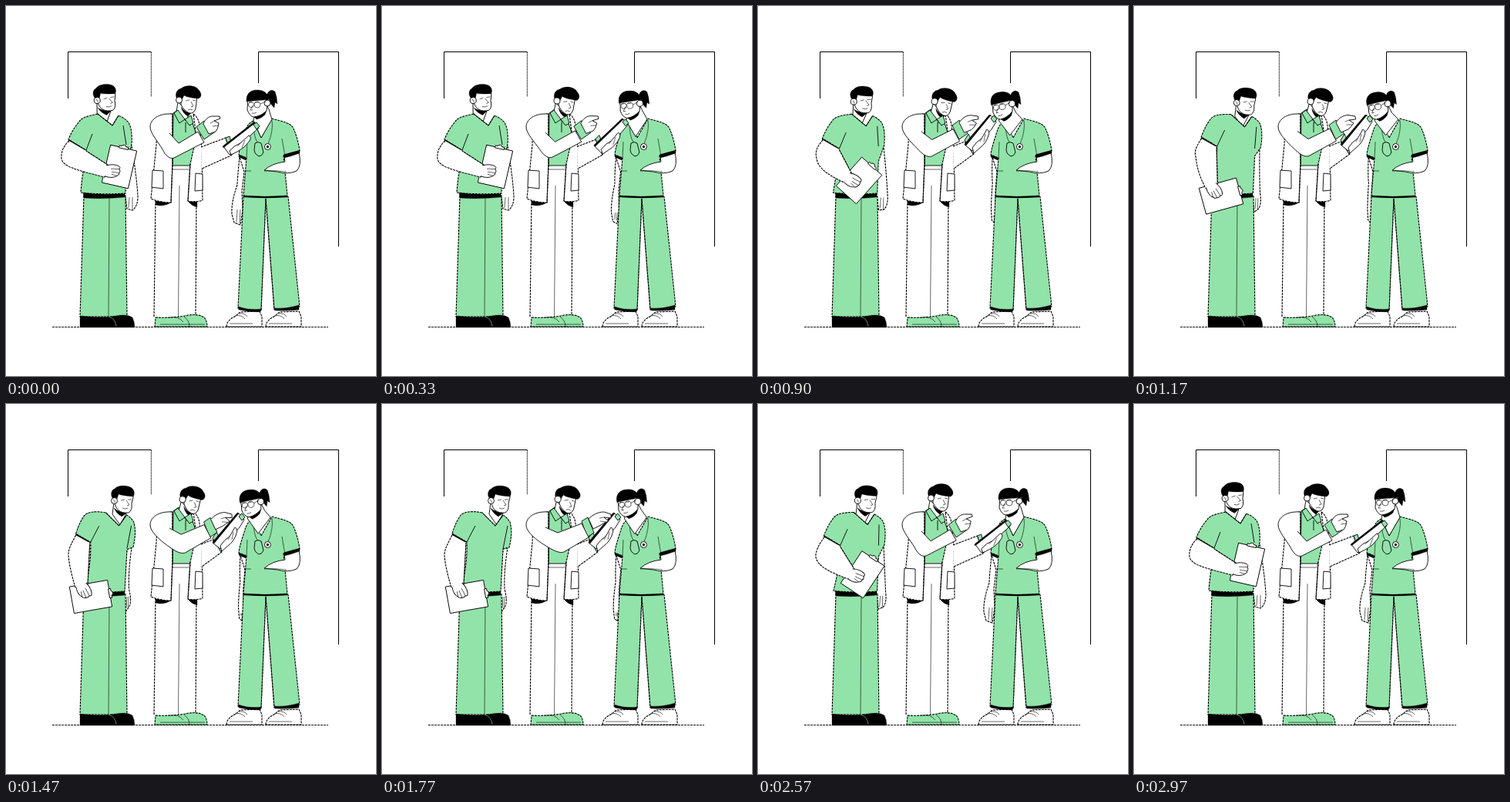
An HTML page that plays this animation: 480x480 px, repeating every 3 s.

```html
<!DOCTYPE html>
<html lang="en">
<head>
<meta charset="utf-8">
<title>Medical team</title>
<style>
html, body { margin: 0; width: 100%; height: 100%; overflow: hidden; background: #fff; }
svg { display: block; width: 100vw; height: 100vh; }
path, circle { stroke: #000; stroke-width: .9; stroke-linejoin: round; fill: none; }
.g { fill: #92e3a9; }
.w { fill: #fff; }
.k { fill: #000; stroke-width: .3; }
.room { stroke-width: 1; }
.dot { stroke-dasharray: 3 1; stroke-width: 1.1; }
.fine { stroke-dasharray: 1 1; stroke-width: 1.4; }
.thin { stroke-width: .6; }
.pale { stroke: #92e3a9; stroke-width: .6; }
</style>
</head>
<body>
<svg id="stage" viewBox="0 0 480 480"></svg>
<script>
const LOOP = 3000;
const stage = document.getElementById('stage');

// Smoothly eased value through [time, value] keys.
function track(t, keys) {
  if (t <= keys[0][0]) return keys[0][1];
  for (let i = 1; i < keys.length; i++) {
    const [t0, v0] = keys[i - 1], [t1, v1] = keys[i];
    if (t <= t1) {
      const x = (t - t0) / (t1 - t0);
      return v0 + (v1 - v0) * x * x * (3 - 2 * x);
    }
  }
  return keys[keys.length - 1][1];
}

const lerp = (a, b, w) => a + (b - a) * w;

// Blends two paths of equal structure; w may depend on the number's index.
function mix(a, b, w) {
  const target = b.match(/-?[\d.]+/g);
  let i = 0;
  return a.replace(/-?[\d.]+/g, n => {
    const k = typeof w === 'function' ? w(i) : w;
    return lerp(+n, +target[i++], k).toFixed(2);
  });
}

const path = (cls, d) => `<path class="${cls}" d="${d}"/>`;
const disc = (cls, x, y, r) => `<circle class="${cls}" cx="${x}" cy="${y}" r="${r}"/>`;
const group = (transform, body) => `<g transform="${transform}">${body}</g>`;

const room =
  path('room', 'M80.5 120V59.5H188.5M327.5 100V59.5H431.5V312') +
  path('fine', 'M188.5 60V117') +
  path('dot', 'M60 416.5H418');

/* Nurse on the left */
const leftLegs =
  path('g dot', 'M101 246L96 403H157L155 246Z') +
  path('thin', 'M134 250L133 403') +
  path('k', 'M96 402Q126 405 142 402Q157 399 164 404Q167 410 167 417H96Z') +
  path('pale', 'M133 403Q142 405 143 416');

const leftNeck =
  path('w', 'M141 127L139 143L149 157L157 142Z') +
  path('k', 'M141 135Q148 141 158 141L151 146Q144 142 141 135Z');

const leftHead =
  path('w', 'M142 117C141 130 143 134 147 138Q152 142 160 141Q165 138 164 129L166 121L165 114Z') +
  path('k', 'M139 122C136 117 138 111 142 110C147 104 160 106 164 109C168 112 168 117 166 120Q152 119 147 117L145 123Z') +
  disc('w', 141.5, 125.5, 4) +
  path('thin', 'M150 125l5 -1M159 124l5 0M157 125l4 6l-3 1M152 135q4 2 7 0M140 124q3 1 2 4');

const board =
  path('w', 'M-17.5 -25H17.5V25H-17.5Z') +
  path('w', 'M-6 -24V-27H-3Q0 -31 3 -27H6V-24Z');

const leftHand =
  path('w', 'M-1 -7Q8 -10 15 -7Q18 -5 16 -3Q18 0 16 2Q16 5 13 6Q7 10 -2 7') +
  path('thin', 'M5 -3L16 -3M6 1L16 2M6 4L13 6');

function leftNurse(body, arm, level) {
  const headPose = `translate(${lerp(-22, 0, body)} ${lerp(-4, 0, level)}) rotate(${lerp(-8, 0, level)} 148 135)`;
  const armPath = mix(
    'M82 175C76 180 71 188 72 198C74 208 88 212 128 222L135 208L104 188',
    'M91 170C86 180 81 188 81 196C82 210 86 225 90 238L106 234L109 180',
    i => i < 6 || i > 15 ? body : arm);
  return path('w dot', mix(
      'M156 178L163 182Q170 225 171 247Q171 260 164 265L157 263L154 240Z',
      'M157 188L163 187Q158 215 159 240Q163 255 160 262L155 270L153 245Z', body)) +
    path('thin', mix('M160 248L159 262M164 248L164 264', 'M157 250L156 264M159 250L158 266', body)) +
    leftLegs +
    path('k', 'M100 242Q125 246 154 243L154 248Q126 251 101 249Z') +
    group(headPose, leftNeck) +
    path('g dot', mix(
      'M119 140C105 143 98 145 95 150C88 158 84 166 81 173L104 187C102 205 98 225 97 242Q125 245 155 243L156 206L163 180C164 165 162 155 158 150Q153 145 146 142L138 155Z',
      'M130 141C115 138 104 140 101 146C96 153 93 162 91 168L110 179C111 200 108 225 99 243Q125 245 154 243L157 188L165 186C169 170 168 160 166 153Q162 147 157 144L147 158Z', body)) +
    path('', mix('M119 140L138 155L146 142M112 166L104 187M152 155L156 180',
      'M130 141L147 158L157 144M121 158L110 179M163 158L157 188', body)) +
    group(headPose, leftHead) +
    path('k', mix('M81 173L104 187Q90 186 81 179Z', 'M91 168L110 179Q98 180 90 174Z', body)) +
    group(`translate(${lerp(147, 110, arm)} ${lerp(208.5, 250, arm)}) rotate(${lerp(13, 80, arm)})`, board) +
    path('w dot', armPath) +
    path('thin', mix('M135 208L104 188', 'M106 234L109 180', i => i > 1 ? body : arm)) +
    group(`translate(${lerp(131, 98, arm)} ${lerp(214, 236, arm)}) rotate(${lerp(2, 62, arm)})`, leftHand);
}

/* Doctor in the middle */
const doctorBody =
  path('w dot', 'M194 252L192 404M246 404L247 252') +
  path('thin', 'M225 233L223.5 404') +
  path('k', 'M194 253L215 254Q206 261 194 258ZM236 253L248 254V261Q240 259 236 253Z') +
  path('g dot', 'M194 404Q213 405 232 402Q250 398 258 405Q261 410 261 416H193Z') +
  path('thin', 'M231 403Q238 408 238 416M200 413H258M212 404q12 -2 18 6') +
  path('g', 'M217 139L224 134L233 145L240 146L248 170L239 207H216Z') +
  path('thin', 'M216 212H238') +
  path('w dot', 'M216 140Q200 140 196 152L195 180L188 250Q200 255 214 255L216 205Z') +
  path('w dot', 'M243 140Q250 145 251 155L254 185L255 252Q246 255 236 253L239 205L247 170Z') +
  path('', 'M214 255L216 205V140M236 253L239 205') +
  path('w', 'M190 213L204 214V237L189 235ZM246 217L255 218V239L245 240Z');

const doctorNeck =
  path('w', 'M223 125L221 137L233 149L239 138Z') +
  path('k', 'M227 131Q232 138 240 139L236 143Q229 139 227 131Z');

const doctorHead =
  path('w', 'M227 115L227 128Q231 136 238 139Q244 140 246 133L248 117Z') +
  path('k', 'M221 119C219 112 223 108 227 107C234 101 247 103 250 109C254 113 254 118 250 120Q236 119 231 116L228 122L225 119Z') +
  disc('w', 224.5, 122, 4) +
  path('thin', 'M233 123l5 -1M242 122l4 1M240 124l3 6l-3 1M236 135q3 -2 6 0');

const collar =
  path('g', 'M218 139L223 135L232 147L225 152ZM232 147L240 142L243 152L238 155Z') +
  path('', 'M233 151V164');

function doctor(lean, lift) {
  const headPose = `translate(${3 * lean} ${2.5 * lean}) rotate(${6 * lean} 232 137)`;
  return doctorBody + group(headPose, doctorNeck) + collar + group(headPose, doctorHead) +
    path('w dot', mix('M253 183L285 171L292 194L254 211', 'M253 182L268 176L280 192L254 211', lift)) +
    path('g', mix('M285 171L290 169L296 190L292 194Z', 'M268 174L273 166L282 184L279 192Z', lift));
}

function pointingArm(reach) {
  return path('g', mix('M247 157L257 149L270 164L257 173Z', 'M259 152L267 147L275 167L266 173Z', reach)) +
    path('w', mix(
      'M256 153C258 147 263 143 268 143L277 143L278 146L270 149L276 152Q275 160 272 163L263 166Z',
      'M268 149C274 143 281 140 288 140L297 143L297 148L288 147L294 152Q288 154 284 157L274 162Z', reach)) +
    path('thin', mix('M270 149L265 152M275 155L268 156', 'M288 147L282 148M291 153L283 152', reach)) +
    path('w', mix(
      'M215 140C198 139 187 147 187 157C187 165 198 177 203 186C207 194 212 199 218 197L257 177L249 163L224 178L212 165',
      'M215 140C198 139 187 147 187 157C187 165 198 175 211 183C222 190 230 194 236 192L268 173L259 155L228 167L212 160', reach));
}

function tablet(lift) {
  return path('w', mix('M282 182L323 151L328 158L318 167L290 193Z', 'M268 180L301 141L309 150L303 160L278 188Z', lift)) +
    path('k', mix('M281 182L322 150L323 152L282 184Z', 'M268 179L300 141L302 142L270 181Z', lift)) +
    path('w', mix(
      'M292 193L290 188Q297 180 304 178L315 168Q319 170 316 175Q310 184 300 189Z',
      'M280 191L278 184Q283 176 290 172L297 160Q301 162 299 168Q296 178 288 184Z', lift)) +
    path('thin', mix('M304 178L300 182M310 174L306 184', 'M290 172L288 176M295 166L293 176', lift)) +
    path('g', mix('M321 154L325 151L329 156L325 160Z', 'M302 146L306 142L310 147L306 151Z', lift));
}

/* Nurse on the right */
const shoe = x => group(`translate(${x} 0)`,
  path('w dot', 'M0 416Q0 408 12 402L18 397L43 396L46 403V416Z') +
  path('thin', 'M11 402q9 -2 13 4M16 399q8 -1 11 4M4 412H34'));

const rightLegs =
  shoe(286) + shoe(337) +
  path('g dot', 'M308 247L301 392Q315 396 331 395L337 250L348 394Q365 395 381 390L366 247Z') +
  path('thin', 'M337 250L331 395M337 250L348 394') +
  path('k', 'M301 390Q316 395 331 393L330 397Q315 397 302 394ZM348 392Q365 393 380 388V394Q365 396 349 395Z');

const rightTorso =
  path('g dot', 'M321 149Q314 152 311 160C308 170 303 183 302 193L312 197L308 246Q336 249 365 246L362 215L360 194L381 188C380 180 377 168 373 159C370 152 360 150 345 146L331 171Z') +
  path('w', 'M380 190Q384 207 377 214Q366 219 352 215L335 213Q345 204 362 202L361 195Z') +
  path('k', 'M360 193L381 187V191Q370 195 361 197ZM302 193L312 197L311 200L302 196ZM308 246Q336 248 365 246V248Q337 250 309 248Z') +
  path('thin', 'M335 214Q350 213 364 215M310 214H318M361 193L375 189M362 195L358 172M312 198L313 176') +
  path('thin', 'M321 152Q321 168 326 177M345 148Q347 162 340 179') +
  path('g', 'M323 178Q327 175 331 178L334 190Q332 195 328 195Q322 192 322 187Z') +
  disc('w', 339.5, 182.5, 4) + disc('k', 339.5, 182.5, 1.5);

const ponytail = path('k', 'M336 121L340 112Q344 107 349 111L351 118L352 127L349 125L348 132Q342 127 341 120Z');

const rightHead =
  path('w', 'M313 121Q314 128 313 134Q315 142 321 144Q330 144 338 136L340 121Z') +
  path('k', 'M322 144Q332 142 338 136L336 141Q331 146 325 147Z') +
  path('k', 'M312 124C311 113 318 108 327 109C335 109 340 114 341 120L339 124Q337 120 335 122Q320 123 312 124Z') +
  disc('w', 339, 126, 4) +
  disc('thin', 318, 128, 3.6) + disc('thin', 326, 128, 4) +
  path('thin', 'M330 127L337 124M315 125l4 0M323 125l5 0M320 129l-3 6l3 0M319 139q3 1 6 -1');

function rightNurse(nod) {
  return path('w dot', mix(
      'M303 196Q300 225 300 232Q292 255 293 270L296 281L304 284L307 265L306 240L309 215Z',
      'M304 196Q303 220 304 230Q302 250 302 265L303 278L306 281L308 265L308 240L310 215Z', nod)) +
    path('thin', mix('M300 264L299 280M304 264L303 282', 'M305 272L305 274M306 272L306 274', nod)) +
    rightLegs + rightTorso +
    path('w', mix('M323 138L321 149L331 171L345 147L341 134L338 128Z',
      'M314 140L313 149L327 168L343 147L335 138L331 130Z', nod)) +
    group(`translate(${-7 * nod} ${nod}) rotate(${-8 * nod} 335 140)`,
      group(`rotate(${8 * nod} 339 116)`, ponytail) + rightHead);
}

function draw(now) {
  const t = now % LOOP;
  const body = track(t, [[570, 0], [1600, 1], [2120, 1], [2970, 0]]);
  const arm = track(t, [[570, 0], [1300, 1], [2040, 1], [2880, 0]]);
  const level = track(t, [[620, 0], [1150, 1], [2500, 1], [2950, 0]]);
  const lean = track(t, [[30, 0], [600, 1], [1500, 1], [2450, 0]]);
  const reach = track(t, [[30, 0], [670, .35], [1170, .5], [1700, 1], [1850, 1], [2620, 0]]);
  const lift = track(t, [[60, 0], [620, 1], [2050, 1], [2620, 0]]);
  const nod = track(t, [[60, 0], [600, 1], [1170, 1.1], [1770, .8], [2170, .6], [2560, 0]]);
  stage.innerHTML = room + leftNurse(body, arm, level) + doctor(lean, lift) +
    rightNurse(nod) + tablet(lift) + pointingArm(reach);
}

const start = performance.now();
function frame() {
  draw(performance.now() - start);
  requestAnimationFrame(frame);
}
frame();
</script>
</body>
</html>
```
